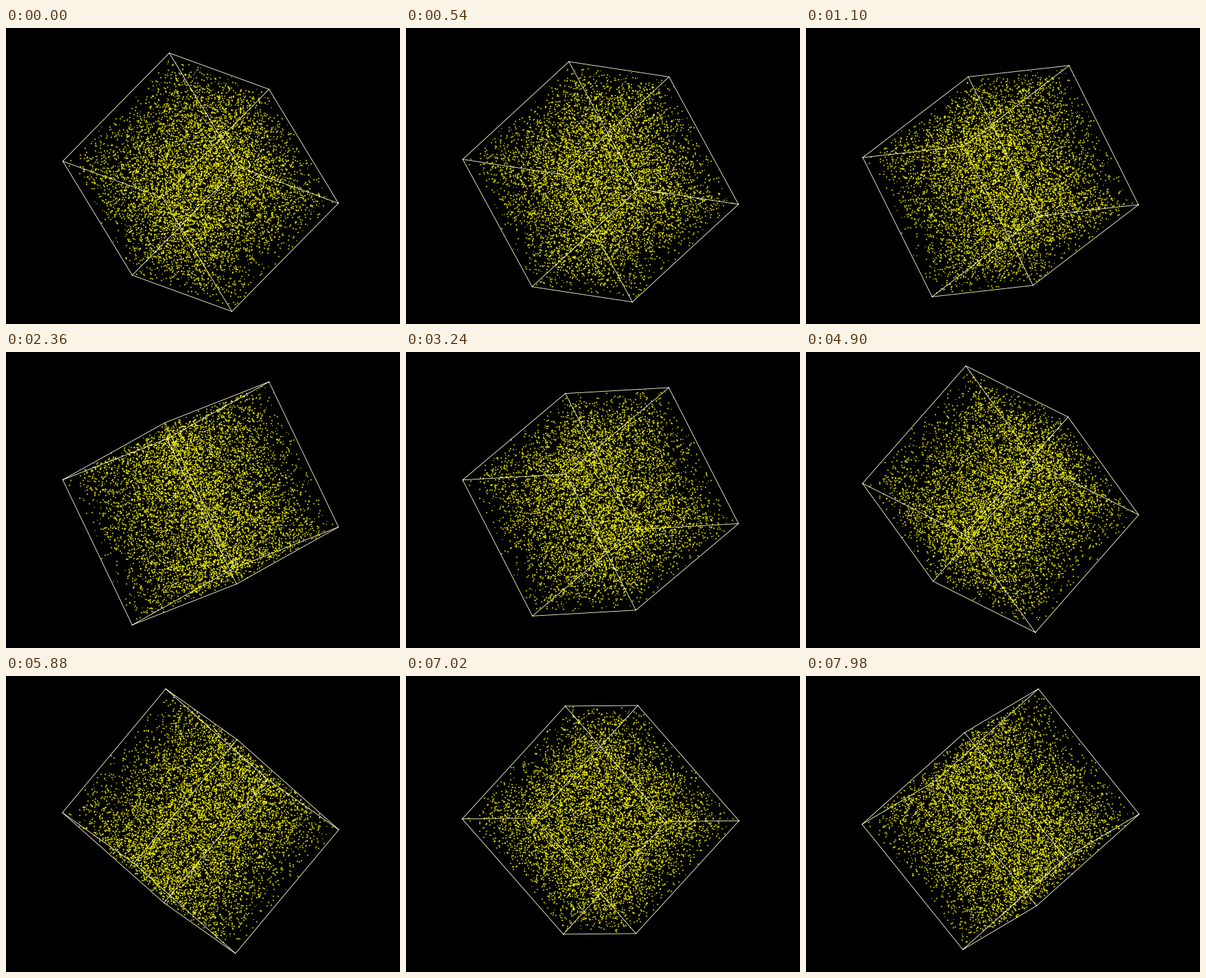
These frames come from a looping animation (574x432 px, 8000 ms). A matplotlib script:

```python
import itertools

import numpy as np
import matplotlib.pyplot as plt
from matplotlib.animation import FuncAnimation

W, H, DPI = 574, 432, 128
PX = 72 / DPI  # one pixel in points
STEP, LOOP = 20, 8000
SIDE = 235.4
POINTS = 8000
LINE = "#ffffd8"

# The picture refreshes every TICK ms but stalls now and then
TICK, STALL = 70, 280
STALL_STARTS = [860, 1100, 2080, 2940, 3240, 4600, 5320, 5880, 7020, 7300]
SPIN_TIMES = [0, 1100, 3240, 4900, 5880, 7980]
SPIN_ANGLES = [0, -21.6, -60, -87, -109, -147.3]
START_Y = np.array([-157, 166, 53])

CORNERS = np.array(list(itertools.product((-0.5, 0.5), repeat=3)))
EDGES = [(a, b) for a, b in itertools.combinations(range(8), 2)
         if np.abs(CORNERS[a] - CORNERS[b]).sum() == 1]
CLOUD = np.random.default_rng(7).random((POINTS, 3)) - 0.5
SMALL = POINTS // 4


def unit(v):
    return v / np.linalg.norm(v)


def shown_time(t):
    start = max([s for s in STALL_STARTS if s <= t], default=-STALL)
    return start if t - start < STALL else t // TICK * TICK


def view(t):
    """Screen axes (x, y, depth) as rows, and the centre height."""
    p = t / LOOP
    angle = np.radians(np.interp(t, SPIN_TIMES, SPIN_ANGLES))
    # the spin axis drifts slowly, and lies a little off the cube's centre
    x = unit(np.array([155 - 9 * p, 101 + 6 * p**2,
                       145 + 6 * np.sin(0.8 * np.pi * p)]))
    cy = 217.2 + 8.4 * np.cos(angle - np.radians(20))
    e1 = unit(START_Y - x * (START_Y @ x))
    y = np.cos(angle) * e1 + np.sin(angle) * np.cross(x, e1)
    return SIDE * np.array([x, y, np.cross(x, y)]), cy


def project(points, axes, cy):
    x, y, depth = axes @ points.T
    return x + 283.5, y + cy, depth


fig = plt.figure(figsize=(W / DPI, H / DPI), dpi=DPI, facecolor="black")
ax = fig.add_axes([0, 0, 1, 1])
ax.set(xlim=(0, W), ylim=(H, 0))
ax.axis("off")


def wire(zorder):
    return ax.plot([], [], color=LINE, lw=0.85 * PX, snap=False,
                   zorder=zorder)[0]


back, front = wire(1), wire(3)
fine, = ax.plot([], [], ",", color="#ffff00", zorder=2)
soft, = ax.plot([], [], "s", color="#f6f600", ms=1.7 * PX, mew=0, zorder=2)
soft.set_snap(False)


def set_edges(line, edges, x, y):
    line.set_data([v for a, b in edges for v in (x[a], x[b], np.nan)],
                  [v for a, b in edges for v in (y[a], y[b], np.nan)])


def draw(i):
    axes, cy = view(shown_time(i * STEP))
    x, y, depth = project(CORNERS, axes, cy)
    far = depth.argmax()
    set_edges(back, [e for e in EDGES if far in e], x, y)
    set_edges(front, [e for e in EDGES if far not in e], x, y)
    x, y, _ = project(CLOUD, axes, cy)
    fine.set_data(x[:SMALL], y[:SMALL])
    soft.set_data(x[SMALL:], y[SMALL:])
    return back, fine, soft, front


anim = FuncAnimation(fig, draw, frames=LOOP // STEP, interval=STEP,
                     repeat=True, repeat_delay=0, blit=False)
plt.show()
```
